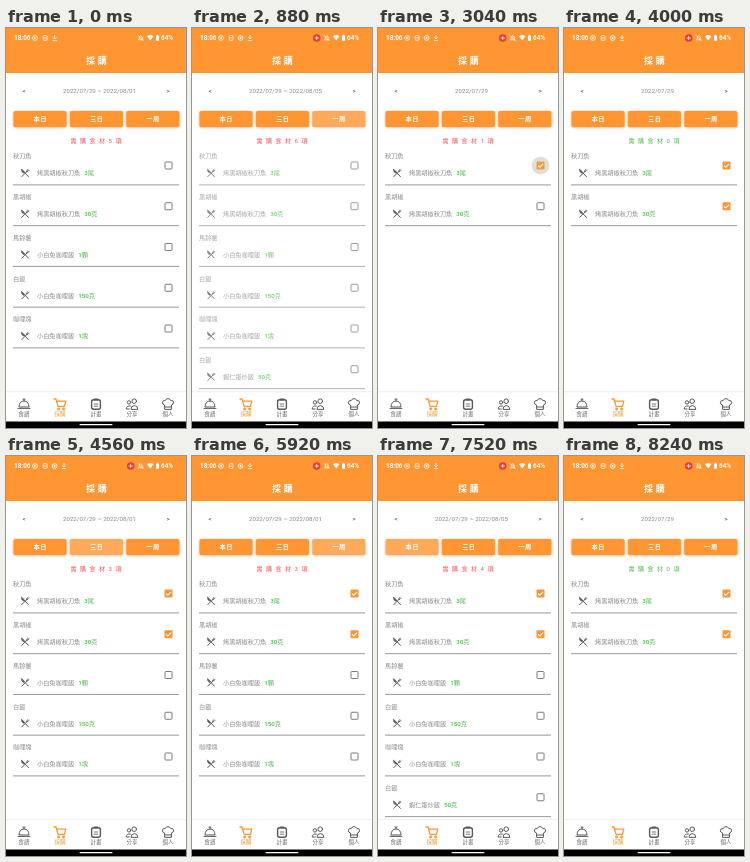
These frames come from a looping animation (180 by 400 pixels, 9.04 s). An HTML page:

```html
<!DOCTYPE html>
<html lang="zh-Hant">
<head>
<meta charset="utf-8">
<title>採購</title>
<style>
  html, body { margin: 0; width: 100%; height: 100%; overflow: hidden; background: #fff; }
  svg { display: block; width: 100vw; height: 100vh; }
  text { font: 6.2px Roboto, "Noto Sans CJK TC", "Noto Sans CJK", sans-serif; fill: #8c8c8c; white-space: pre; }
  .mid { text-anchor: middle; }
  .title { font-size: 9px; font-weight: 700; fill: #fff; letter-spacing: 2.8px; }
  .status { font-size: 6.4px; font-weight: 700; fill: #fff; }
  .btn text { font-weight: 700; fill: #fff; letter-spacing: .6px; }
  .orange { fill: #ff9632; }
  #count { font-size: 6px; word-spacing: 2px; }
  .qty { fill: #4fbb4f; font-weight: 500; }
  .rule { stroke: #999; stroke-width: 1; }
  .box { fill: none; stroke: #7c7c7c; stroke-width: 1; }
  .tab text { font-size: 5.4px; fill: #666; }
  .line { fill: none; stroke: #5a5a5a; stroke-width: 1; stroke-linecap: round; stroke-linejoin: round; }
  .white { fill: none; stroke: #fff; stroke-width: .8; }
  .tab.on text { fill: #ff9632; }
  .tab.on .line { stroke: #ff9632; stroke-width: 1.3; }
</style>
</head>
<body>
<svg id="stage" viewBox="0 0 180 400" preserveAspectRatio="none">
  <defs>
    <filter id="soft" x="-10%" y="-30%" width="120%" height="160%"><feGaussianBlur stdDeviation=".9"/></filter>
    <g id="tools" class="line">
      <path d="M-3.2 3.6 1.8 -1.4M-3.2 -3.4 3.4 3.6"/>
      <path d="M-3.6 -3.6Q-4 -1.6 -1.6 .2L-.6 -.8Z" fill="#5a5a5a" stroke-width=".5"/>
      <path d="M1.6 -1.6Q1.2 -2.8 2.8 -3.8M1.8 -1.4Q3 -1 4 -2.6M1.8 -1.4 3.5 -3.2" stroke-width=".7"/>
    </g>
    <g id="tick">
      <rect class="orange" x="-4" y="-4" width="8" height="8" rx="1"/>
      <path d="M-2.4 .1-.7 1.8 2.5 -1.7" fill="none" stroke="#fff" stroke-width="1.1"/>
    </g>
    <g id="ring" class="white"><circle r="2.4"/><path d="M-1.2 0H1.2M0 -1.2V1.2"/></g>
  </defs>
  <g id="list"></g>
  <text id="date" class="mid" x="93.5" y="65.3"></text>
  <text class="mid" x="18" y="65" style="fill:#333">&lt;</text>
  <text class="mid" x="162" y="65" style="fill:#333">&gt;</text>
  <g id="buttons"></g>
  <text id="count" class="mid" x="90" y="115.2"></text>

  <rect class="orange" width="180" height="45"/>
  <text class="title mid" x="91.8" y="36.4">採購</text>
  <text class="status" x="8" y="12.3">18:06</text>
  <use href="#ring" x="29" y="10"/>
  <g class="white">
    <rect x="37.2" y="7.6" width="3.8" height="4.8" rx="1"/><path d="M38.1 10h2"/>
    <path id="load" d="M0 -3V1M-1.8 -.7 0 1.1 1.8 -.7M-2.1 2.6H2.1"/>
    <path d="M132.6 11.8h4.4l-.7-1.2v-1.6q-1.5-2.6-3 0v1.6ZM132 7.4l5.4 5.4"/>
  </g>
  <g id="live">
    <use href="#ring" x="48.6" y="10"/>
    <circle cx="124.7" cy="10" r="3.8" fill="#e8383d"/>
    <path class="white" d="M122.6 10h4.2M124.7 7.9v4.2"/>
  </g>
  <path d="M141 8.3q3.2-2.5 6.4 0L144.2 12.6Z" fill="#fff"/>
  <rect x="150" y="7.4" width="3" height="5.4" rx=".6" fill="#fff"/><rect x="150.9" y="6.8" width="1.2" height="1" fill="#fff"/>
  <text class="status" x="155" y="12.3">64%</text>

  <rect y="363.5" width="180" height="30" fill="#fff"/>
  <path d="M0 363.7H180" stroke="#e2e2e2" stroke-width=".6"/>
  <g id="tabs"></g>
  <rect y="393.5" width="180" height="6.5"/>
  <rect x="73.5" y="396" width="33" height="1.2" rx=".6" fill="#fff"/>
</svg>
<script>
const LOOP = 9040, PITCH = 40.75;
const $ = id => document.getElementById(id);
const clamp = v => Math.max(0, Math.min(1, v));
const ramp = (t, a, b) => clamp((t - a) / (b - a));

const FOODS = [
  ['秋刀魚', '烤黑胡椒秋刀魚', '3尾'],
  ['黑胡椒', '烤黑胡椒秋刀魚', '30克'],
  ['馬鈴薯', '小白兔咖哩飯', '1顆'],
  ['白飯', '小白兔咖哩飯', '150克'],
  ['咖哩塊', '小白兔咖哩飯', '1塊'],
  ['白飯', '蝦仁蛋炒飯', '50克']
];
const RANGES = [
  { name: '本日', end: '', rows: 2 },
  { name: '三日', end: ' ~ 2022/08/01', rows: 5 },
  { name: '一周', end: ' ~ 2022/08/05', rows: 6 }
];
// Button taps: press, text update, list swap, list shown, release
const TAPS = [
  { to: 2, press: 80, text: 480, swap: 640, shown: 960, up: 960 },
  { to: 0, press: 1040, text: 1560, swap: 1760, shown: 1920, up: 2000 },
  { to: 1, press: 4160, text: 4240, swap: 4360, shown: 4520, up: 4960 },
  { to: 2, press: 5760, text: 6000, swap: 6160, shown: 6480, up: 6480 },
  { to: 0, press: 7200, text: 7640, swap: 7840, shown: 8000, up: 8080 }
];
const CHECKS = [
  { press: 2480, on: 2640, up: 3280 },
  { press: 3200, on: 3360, up: 4000 }
];
const TABS = [
  ['食譜', '<path d="M-5 2.6Q-4.6 -3 0 -3T5 2.6ZM-6 4.4H6M0 -3V-4.6M-1 -4.9H1"/>'],
  ['採購', '<path d="M-6 -5H-4L-2 2.4H4.4L5.8 -2.8H-3.4"/><circle cx="-1.4" cy="5" r=".8"/><circle cx="3.6" cy="5" r=".8"/>'],
  ['計畫', '<rect x="-4.4" y="-4.2" width="8.8" height="9.4" rx="2" stroke-width="1.4"/><path d="M-1.6 -4.6H1.6" stroke-width="2"/><path d="M-1.8 0H1.8M-1.8 2.2H1.8" stroke-width=".8"/>'],
  ['分享', '<circle cx="2.2" cy="-2.8" r="2.3"/><circle cx="-3" cy="-1.6" r="1.7"/><path d="M-1 5Q-1 1.6 2.4 1.6T5.8 5ZM-1.6 2Q-5.8 1.4 -5.8 5H-2.8"/>'],
  ['個人', '<path d="M-3.4 5V1Q-6 .4 -5.6 -1.8T-2.8 -3.4Q-2 -5.4 0 -5.4T2.8 -3.4Q5.4 -4 5.6 -1.8T3.4 1V5ZM-3.4 3H3.4"/>']
];

$('list').innerHTML = FOODS.map(([food, dish, qty], i) => `
  <g class="row" transform="translate(0 ${i * PITCH})">
    <text x="7" y="130.4">${food}</text>
    <use href="#tools" x="19" y="145"/>
    <text x="31" y="147.3">${dish}<tspan class="qty" dx="4">${qty}</tspan></text>
    <path class="rule" d="M7 156.9H173"/>
    <g transform="translate(162.5 137.5)">
      <circle class="ripple" r="9" opacity="0"/>
      <rect class="box" x="-3.5" y="-3.5" width="7" height="7" rx=".7"/>
      <use class="tick" href="#tick" visibility="hidden"/>
    </g>
  </g>`).join('');

$('buttons').innerHTML = RANGES.map((r, i) => `
  <g class="btn" transform="translate(${7.5 + i * 56.4} 83)">
    <g class="face">
      <rect y=".5" width="53" height="16" rx="2" fill="#f08a50" opacity=".8" filter="url(#soft)"/>
      <rect class="orange" width="53" height="16" rx="1.6"/>
    </g>
    <text class="mid" x="26.8" y="10.3">${r.name}</text>
  </g>`).join('');

$('tabs').innerHTML = TABS.map(([name, icon], i) => `
  <g class="tab${i === 1 ? ' on' : ''}" transform="translate(${18 + i * 36} 376)">
    <g class="line">${icon}</g>
    <text class="mid" y="12.4">${name}</text>
  </g>`).join('');

const all = css => [...document.querySelectorAll(css)];
const rows = all('.row'), faces = all('.face'), ripples = all('.ripple');
const ticks = all('.tick'), boxes = all('.box');
const show = (el, on) => el.setAttribute('visibility', on ? 'inherit' : 'hidden');
const fade = (el, v) => el.setAttribute('opacity', v);
const write = (el, s) => { if (el.textContent !== s) el.textContent = s; };

function draw(t) {
  let range = 1, shown = 1, alpha = 1;
  const press = [0, 0, 0];
  for (const p of TAPS) {
    if (t >= p.text) range = p.to;
    if (t >= p.swap) shown = p.to;
    if (t >= p.text && t < p.shown)
      alpha = t < p.swap ? 1 - ramp(t, p.text, p.swap) : ramp(t, p.swap, p.shown);
    press[p.to] += ramp(t, p.press, p.press + 120) * (1 - ramp(t, p.up - 60, p.up));
  }
  const { end, rows: total } = RANGES[range];
  const left = total - CHECKS.filter(c => t >= c.on).length;
  write($('date'), '2022/07/29' + end);
  write($('count'), `需 購 食 材 ${left} 項`);
  $('count').style.fill = left ? '#fb5054' : '#4fbb4f';

  fade($('list'), alpha);
  rows.forEach((row, i) => show(row, i < RANGES[shown].rows));
  faces.forEach((face, i) => fade(face, 1 - .2 * press[i]));
  CHECKS.forEach((c, i) => {
    const on = t >= c.on;
    show(ticks[i], on);
    show(boxes[i], !on);
    ripples[i].setAttribute('r', 4 + 5 * ramp(t, c.press, c.press + 240));
    fade(ripples[i], .13 * ramp(t, c.press, c.press + 100) * (1 - ramp(t, c.up - 200, c.up)));
  });

  const live = t >= 80;
  show($('live'), live);
  $('load').setAttribute('transform', `translate(${live ? 58 : 48.6} 10)`);
}

const start = performance.now();
function tick() {
  draw((performance.now() - start) % LOOP);
  requestAnimationFrame(tick);
}
draw(0);
tick();
</script>
</body>
</html>
```
